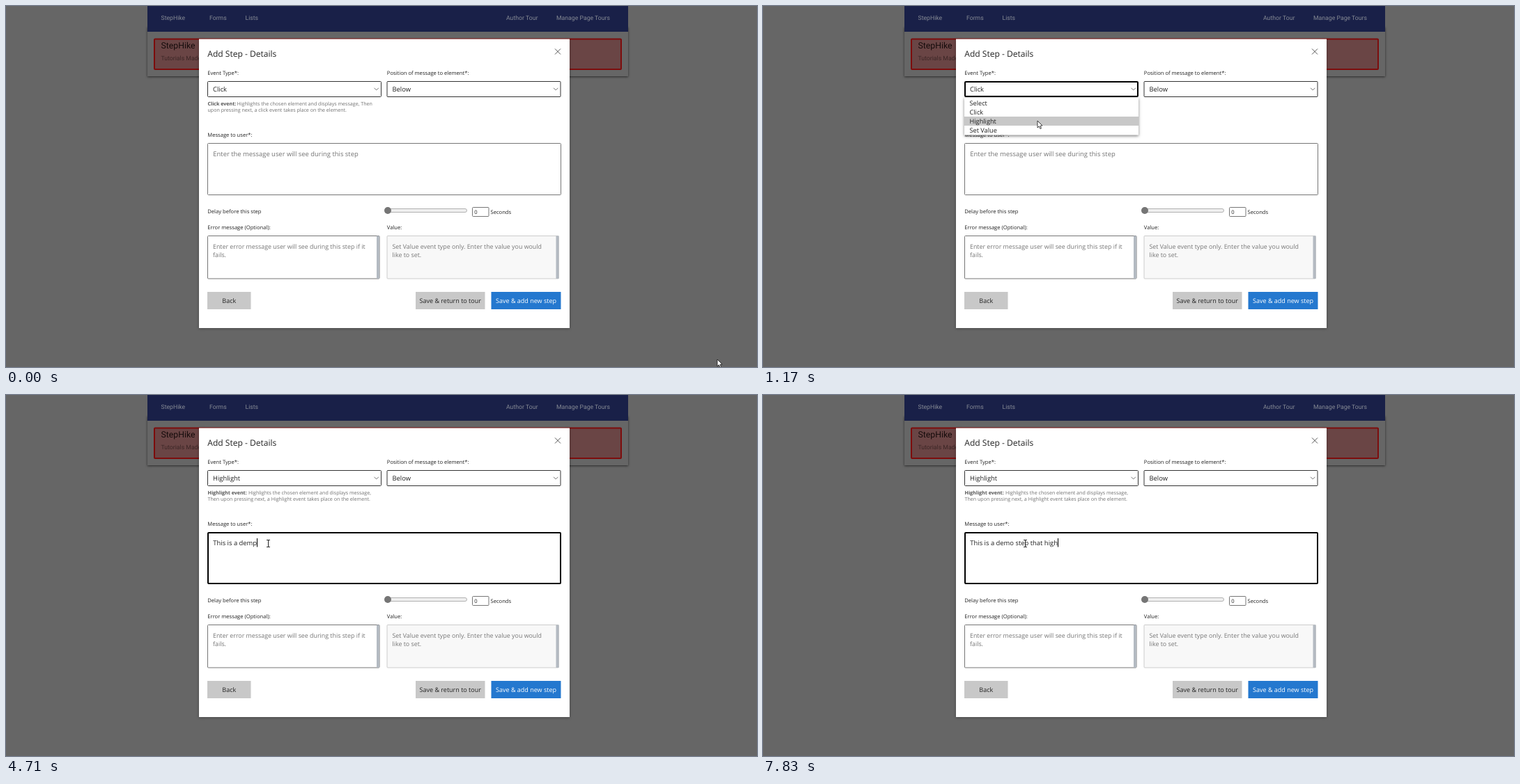
Write an HTML page with a canvas that moves like this. It is 1078 px wide and 519 px high and loops after 8 s.

```html
<!DOCTYPE html>
<html lang="en">
<head>
<meta charset="utf-8">
<title>Add Step</title>
<style>
  html, body { margin: 0; width: 100%; height: 100%; overflow: hidden; background: #666; }
  canvas { display: block; }
</style>
</head>
<body>
<canvas id="stage" width="1078" height="519"></canvas>
<script>
const ctx = document.getElementById('stage').getContext('2d');
const LOOP = 8000;
const SANS = '"Open Sans", "Noto Sans", sans-serif';
const ROBOTO = 'Roboto, sans-serif';
const GREY = '#757575';

const OPEN = 680, PICK = 1345, FOCUS = 1710;
const OPTIONS = ['Select', 'Click', 'Highlight', 'Set Value'];
const MESSAGE = 'This is a demo step that high';

// Times at which one more character of the message appears.
const TYPO_END = 5240;
const FIRST_KEYS = [2580, 2780, 2910, 3040, 3180, 3310, 3380, 3580, 3780, 3910, 4310, 4380, 4510, 4710];
const LATER_KEYS = [5370, 5570, 5700, 5900, 6100, 6230, 6500, 6630, 6700, 6830, 6960, 7030,
  7430, 7560, 7690, 7830];

// Pointer stops: time, x, y.
const PATH = [[0, 1021, 508], [70, 1021, 508], [640, 423, 129], [850, 423, 129],
  [1130, 394, 165], [1400, 394, 165], [1640, 376, 213], [LOOP, 376, 213]];

function fill(x, y, w, h, color) {
  ctx.fillStyle = color;
  ctx.fillRect(x, y, w, h);
}

function frame(x, y, w, h, color, line = 1, back = '#fff') {
  ctx.beginPath();
  ctx.roundRect(x + line / 2, y + line / 2, w - line, h - line, 1);
  ctx.fillStyle = back;
  ctx.fill();
  ctx.strokeStyle = color;
  ctx.lineWidth = line;
  ctx.stroke();
}

function text(str, x, y, size, color = '#222', { family = SANS, weight = 400, align = 'left' } = {}) {
  ctx.font = `${weight} ${size}px ${family}`;
  ctx.textAlign = align;
  ctx.fillStyle = color;
  ctx.fillText(str, x, y);
}

function polyline(points, color, width) {
  ctx.beginPath();
  points.forEach(([x, y]) => ctx.lineTo(x, y));
  ctx.strokeStyle = color;
  ctx.lineWidth = width;
  ctx.stroke();
}

function disc(x, y, r, color) {
  ctx.beginPath();
  ctx.arc(x, y, r, 0, Math.PI * 2);
  ctx.fillStyle = color;
  ctx.fill();
}

function withShadow(color, blur, dy, draw) {
  ctx.save();
  ctx.shadowColor = color;
  ctx.shadowBlur = blur;
  ctx.shadowOffsetY = dy;
  draw();
  ctx.restore();
}

function pointerAt(t) {
  const i = PATH.findIndex((p, n) => n > 0 && t <= p[0]);
  const [t0, x0, y0] = PATH[i - 1], [t1, x1, y1] = PATH[i];
  const p = (t - t0) / (t1 - t0);
  const e = p * p * (3 - 2 * p);
  return { x: x0 + (x1 - x0) * e, y: y0 + (y1 - y0) * e };
}

function typedAt(t) {
  const count = keys => keys.filter(k => k <= t).length;
  if (t < TYPO_END) return 'This is a demp'.slice(0, count(FIRST_KEYS));
  return MESSAGE.slice(0, 13 + count(LATER_KEYS));
}

function caretShown(t) {
  return t >= FOCUS && !(t >= 2310 && t < 2580) && !(t >= 5170 && t < TYPO_END);
}

function drawPage() {
  fill(0, 0, 1078, 519, '#666');
  withShadow('rgba(0,0,0,.6)', 3, 1, () => fill(203, 30, 690, 71, '#666'));
  fill(203, 0, 690, 37, '#192048');
  const nav = { family: ROBOTO };
  [['StepHike', 222.5], ['Forms', 292], ['Lists', 343.5], ['Author Tour', 718], ['Manage Page Tours', 790]]
    .forEach(([label, x]) => text(label, x, 19.8, 8.7, '#858994', nav));
  frame(212, 46.5, 672, 45.5, '#7d0c0c', 2, '#6a4545');
  text('StepHike', 222.5, 61.2, 12.3, '#160c0c', nav);
  text('Tutorials Made Easy', 222.5, 77.6, 8.7, '#3b2626', nav);
}

function drawSelect(x, value, focused) {
  frame(x, 108, 250, 23, focused ? '#000' : '#333', focused ? 2 : 1);
  text(value, x + 8, 123, 9.4);
  polyline([[x + 239.5, 117.8], [x + 242.7, 121], [x + 245.9, 117.8]], '#666', 0.9);
}

function drawHelp(value) {
  const picked = value === 'Highlight';
  const rows = picked
    ? ['Highlights the chosen element and displays message,',
       'Then upon pressing next, a Highlight event takes place on the element.']
    : ['Highlights the chosen element and displays message, Then',
       'upon pressing next, a click event takes place on the element.'];
  text(value + ' event:', 289.5, 143.2, 7.1, '#555', { weight: 700 });
  text(rows[0], picked ? 348 : 331.5, 143.2, 7.1, '#707070');
  text(rows[1], 289.5, 152, 7.1, '#707070');
}

function drawButton(label, x, w, back, color) {
  fill(x, 411, w, 25, back);
  text(label, x + w / 2, 427, 9, color, { align: 'center' });
}

function drawNote(x, w, lines, border, back, color) {
  frame(x, 330, w, 62.5, border, 1, back);
  fill(x + w - 4.5, 330.5, 4, 61.5, '#b4bac2');
  lines.forEach((line, i) => text(line, x + 8, 348.8 + i * 12.4, 8.85, color));
}

function drawMessage(t, mouse) {
  const focused = t >= FOCUS;
  const hover = mouse.y > 197 && mouse.y < 272;
  frame(289, 197, 508, 75, focused ? '#000' : hover ? '#333' : '#767676', focused ? 2 : 1);
  const typed = typedAt(t);
  const shown = typed || 'Enter the message user will see during this step';
  text(shown, 297.3, 215.7, 9.42, typed ? '#222' : GREY);
  if (caretShown(t)) {
    const x = typed ? 297.3 + ctx.measureText(typed).width : 297;
    fill(Math.round(x), 206, 1, 12.5, '#000');
  }
}

function drawDialog(t, mouse) {
  const value = t < PICK ? 'Click' : 'Highlight';
  withShadow('rgba(0,0,0,.3)', 4, 1, () => fill(277, 47.5, 532, 415.5, '#fff'));
  text('Add Step - Details', 289.3, 73, 12.05);
  polyline([[788, 61.5], [796, 69.5]], '#555', 1);
  polyline([[796, 61.5], [788, 69.5]], '#555', 1);

  [['Event Type*:', 289.3, 98.7], ['Position of message to element*:', 546.8, 98.7],
   ['Message to user*:', 289.3, 187.6], ['Delay before this step', 289.3, 297.8],
   ['Error message (Optional):', 289.3, 320.8], ['Value:', 546.8, 320.8], ['Seconds', 695.5, 298.8]]
    .forEach(([label, x, y]) => text(label, x, y, 7.62));

  drawSelect(289, value, t >= OPEN && t < FOCUS);
  drawSelect(546.5, 'Below', false);
  drawHelp(value);
  drawMessage(t, mouse);

  ctx.beginPath();
  ctx.roundRect(545, 291.5, 116.5, 5, 2.5);
  ctx.fillStyle = '#efefef';
  ctx.fill();
  ctx.strokeStyle = '#b2b2b2';
  ctx.lineWidth = 1;
  ctx.stroke();
  disc(548, 294, 5, '#757575');
  frame(669, 289, 24.5, 14, '#767676');
  text('0', 672.3, 299, 7.6);

  drawNote(289, 247.5, ['Enter error message user will see during this step if it', 'fails.'],
    '#767676', '#fff', GREY);
  drawNote(546.5, 247.5, ['Set Value event type only. Enter the value you would', 'like to set.'],
    '#ccc', '#f8f8f8', '#777');

  drawButton('Back', 289, 62.5, '#c8c8c8', '#222');
  drawButton('Save & return to tour', 588, 99.5, '#c8c8c8', '#222');
  drawButton('Save & add new step', 696.5, 100, '#2478cf', '#fff');

  if (t >= OPEN && t < PICK) drawOptions(mouse);
}

function drawOptions(mouse) {
  withShadow('rgba(0,0,0,.5)', 4, 1, () => fill(289, 132, 250, 53.5, '#fff'));
  const active = mouse.y < 133 ? 1 : Math.max(1, Math.floor((mouse.y - 133) / 13));
  fill(289, 133 + active * 13, 250, 13, '#c8c8c8');
  OPTIONS.forEach((label, i) => text(label, 296.5, 143 + i * 13, 9.2));
}

function drawPointer(t, { x, y }) {
  const pressed = (t >= OPEN - 40 && t < 820) || (t >= 1240 && t < 1380) || (t >= 1680 && t < 1850);
  if (pressed) disc(x, y + 1, 8, 'rgba(250,232,10,.72)');
  if (y > 197 && y < 272 && t > PICK) {
    polyline([[x - 2, y - 4.5], [x + 3, y - 4.5]], '#333', 1);
    polyline([[x + 0.5, y - 4.5], [x + 0.5, y + 5.5]], '#222', 1);
    polyline([[x - 2, y + 5.5], [x + 3, y + 5.5]], '#333', 1);
    return;
  }
  ctx.beginPath();
  [[0, 0], [0, 10], [2.3, 7.9], [3.9, 11.5], [5.5, 10.8], [4, 7.3], [7, 7]]
    .forEach(([dx, dy]) => ctx.lineTo(x + dx, y + dy));
  ctx.closePath();
  ctx.fillStyle = '#fff';
  ctx.fill();
  ctx.strokeStyle = '#111';
  ctx.lineWidth = 0.8;
  ctx.stroke();
}

function draw(now) {
  const t = now % LOOP;
  const mouse = pointerAt(t);
  ctx.textRendering = 'geometricPrecision';
  drawPage();
  drawDialog(t, mouse);
  drawPointer(t, mouse);
}

const start = performance.now();
function tick() {
  draw(performance.now() - start);
  requestAnimationFrame(tick);
}
tick();
</script>
</body>
</html>
```
